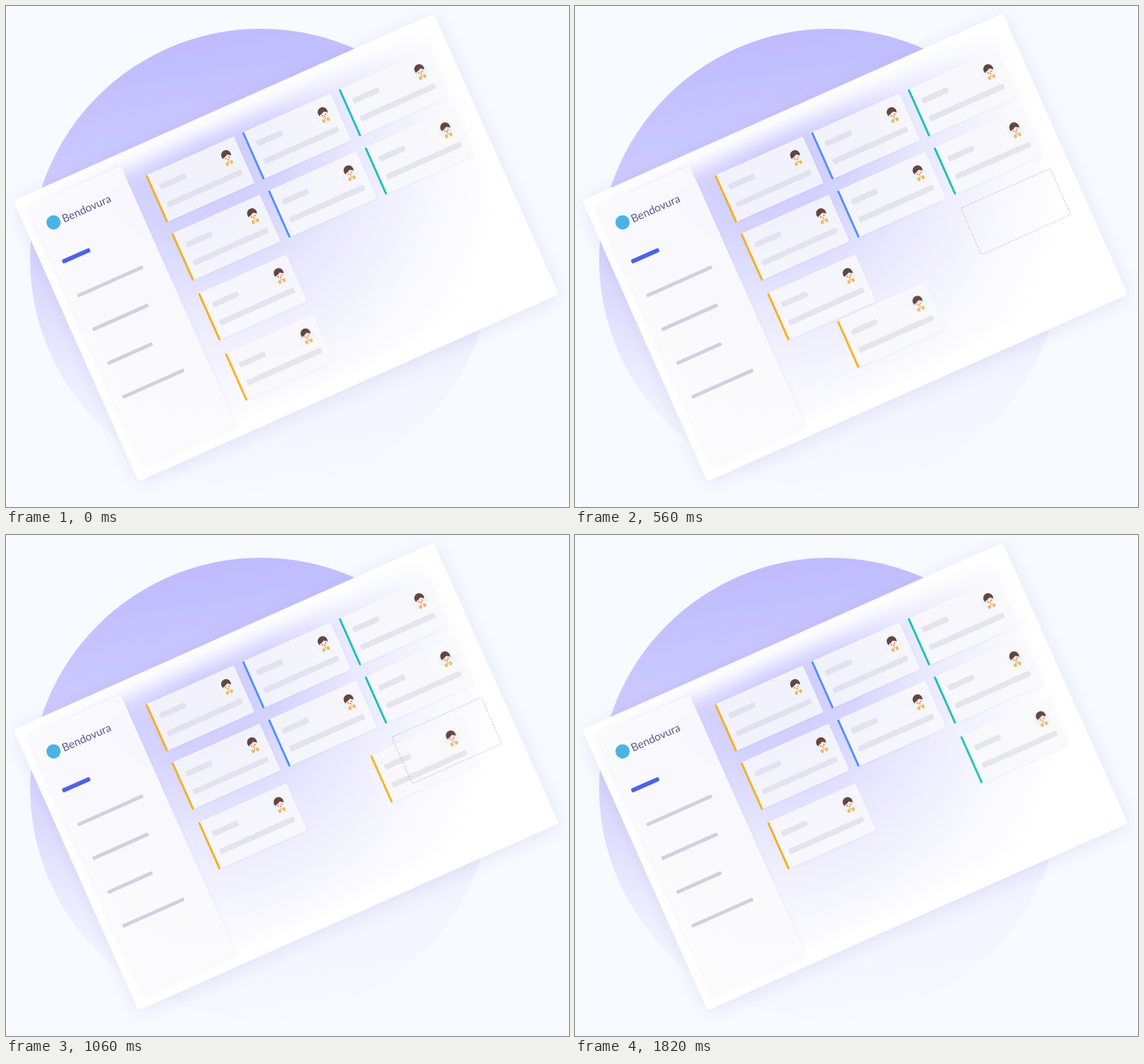
An HTML page that plays this animation: 793 px wide and 706 px high, repeating every 4.46 s.

```html
<!DOCTYPE html>
<html lang="en">
<head>
<meta charset="utf-8">
<title>Task board</title>
<style>
  html, body { margin: 0; width: 100%; height: 100%; overflow: hidden; background: #f7fbff; }
  svg { display: block; width: 100%; height: 100%; }
  .panel { fill: #fff; filter: drop-shadow(0 4px 12px rgba(90, 90, 190, .14)); }
  .sidebar { fill: #fcfcfd; fill-opacity: .9; filter: drop-shadow(0 1px 3px rgba(90, 90, 160, .08)); }
  .sheet { fill: #fcfcfd; fill-opacity: .82; filter: drop-shadow(0 1px 1.5px rgba(90, 90, 180, .09)); }
  .bar { fill: #c4c4da; fill-opacity: .38; }
  .menu { fill: #d0d0e1; }
  .brand { font: 15.5px Lato, sans-serif; fill: #5a5a8f; }
  .slot { fill: none; stroke: #b8b8c2; stroke-dasharray: 2 2; }
</style>
</head>
<body>
<svg viewBox="0 0 793 706">
  <defs>
    <linearGradient id="discFill" x1=".42" y1="0" x2=".58" y2="1">
      <stop offset="0" stop-color="#bfbbff"/>
      <stop offset=".28" stop-color="#cdcbff"/>
      <stop offset=".5" stop-color="#dddcfe"/>
      <stop offset=".66" stop-color="#eaebff"/>
      <stop offset=".8" stop-color="#f2f5ff"/>
      <stop offset="1" stop-color="#f6faff"/>
    </linearGradient>
    <radialGradient id="glow" gradientUnits="userSpaceOnUse" cx="270" cy="205" r="430"
        gradientTransform="rotate(24) translate(-10.4 -274.3)">
      <stop offset="0" stop-color="#cccaff"/>
      <stop offset=".25" stop-color="#d4d2ff"/>
      <stop offset=".5" stop-color="#e8e8ff"/>
      <stop offset=".75" stop-color="#f6f6ff"/>
      <stop offset="1" stop-color="#fff"/>
    </radialGradient>
    <filter id="soft" x="-10%" y="-10%" width="120%" height="120%">
      <feGaussianBlur stdDeviation="13"/>
    </filter>
    <clipPath id="panelClip"><rect width="648" height="433" rx="4"/></clipPath>

    <g id="avatar">
      <circle r="12" fill="#eef5fd"/>
      <path d="M-4.5 2H4.5L6 10.5H-6Z" fill="#fff3ea"/>
      <circle cx=".3" cy="-4.2" r="7" fill="#65463f"/>
      <ellipse cx=".3" cy="-.6" rx="5.9" ry="4.8" fill="#fde8df"/>
      <path d="M-6.2-1.5Q-5-7 1-7Q6-6 6.8-1.5Q4-2.6 2-4.4Q-2-1.8-6.2-1.5Z" fill="#65463f"/>
      <circle cx="-2.3" cy=".2" r=".7" fill="#4a3030"/>
      <circle cx="2.9" cy=".2" r=".7" fill="#4a3030"/>
      <ellipse cx=".3" cy="2.4" rx="1.2" ry=".8" fill="#e2655f"/>
      <rect x="-5.2" y="5.5" width="4" height="5" rx="1.5" fill="#e5bd62"/>
      <rect x="1.4" y="5.5" width="4" height="5" rx="1.5" fill="#e5bd62"/>
      <circle cy="5.8" r="1.6" fill="#f3c4ae"/>
    </g>
    <g id="card">
      <rect class="sheet" width="135" height="72" rx="2"/>
      <rect x="-1.2" y=".3" width="2.8" height="72" rx="1" fill="currentColor"/>
      <rect class="bar" x="11" y="19" width="39.7" height="8" rx="2"/>
      <rect class="bar" x="10.3" y="46.3" width="115" height="8" rx="2"/>
      <use href="#avatar" x="114" y="23.9"/>
    </g>
  </defs>

  <rect width="793" height="706" fill="#f7fbff"/>
  <circle cx="359" cy="357" r="325" fill="url(#discFill)"/>

  <g transform="translate(10.4 274.3) rotate(-24)">
    <rect class="panel" width="648" height="433" rx="4"/>
    <g clip-path="url(#panelClip)">
      <rect width="648" height="433" fill="url(#glow)"/>
      <rect width="648" height="433" fill="none" stroke="#fff" stroke-width="50" filter="url(#soft)"/>
    </g>
    <rect class="sidebar" x="15" y="17" width="143" height="400" rx="2"/>
    <circle cx="39.2" cy="51" r="10" fill="#4bb3e4"/>
    <text class="brand" x="52.5" y="57.5">Bendovura</text>
    <g id="menu"><rect x="28" y="104" width="42.5" height="6" rx="2" fill="#4d62e8"/></g>
    <g id="board"></g>
    <rect id="slot" class="slot" x="482.5" y="226.5" width="138" height="71.5" rx="2"/>
  </g>
</svg>
<script>
  const LOOP = 4460;
  const AMBER = '#faad14', BLUE = '#4d90fe', TEAL = '#13c2b3';
  const LEFT = 185.5, TOP = 43.5, COLUMN = 148.9;
  const ROWS = [0, 89.8, 182, 275];
  const board = document.getElementById('board');

  function add(parent, tag, attrs) {
    const node = document.createElementNS('http://www.w3.org/2000/svg', tag);
    for (const key in attrs) node.setAttribute(key, attrs[key]);
    return parent.appendChild(node);
  }

  function addCard(column, row, color) {
    const card = add(board, 'use', { href: '#card', x: LEFT + column * COLUMN, y: TOP + ROWS[row] });
    card.style.color = color;
    return card;
  }

  [100.7, 86, 69, 94.7].forEach((width, i) =>
    add(document.getElementById('menu'), 'rect',
      { class: 'menu', x: 28, y: 157 + i * 52.1, width, height: 5, rx: 1.5 }));

  [[AMBER, 3], [BLUE, 2], [TEAL, 2]].forEach(([color, count], column) => {
    for (let row = 0; row < count; row++) addCard(column, row, color);
  });
  const dragged = addCard(0, 3, AMBER);

  // Each step is [time in ms, styles, easing to the next step].
  function loop(node, steps) {
    const frames = steps.map(([time, style, easing = 'linear']) =>
      ({ offset: time / LOOP, easing, ...style }));
    node.animate(frames, { duration: LOOP, iterations: Infinity });
  }

  const at = (x, y) => ({ transform: `translate(${x}px, ${y}px)` });
  const drop = at(2 * COLUMN, ROWS[2] - ROWS[3]);

  loop(dragged, [
    [0, at(0, 0), 'ease'],
    [380, at(22.5, 0), 'ease'],
    [1580, drop],
    [LOOP, drop]
  ]);
  loop(dragged, [
    [0, { color: AMBER }, 'step-end'],
    [1820, { color: TEAL }],
    [LOOP, { color: TEAL }]
  ]);
  loop(document.getElementById('slot'), [
    [0, { opacity: 0 }],
    [200, { opacity: 1 }, 'step-end'],
    [1700, { opacity: 0 }],
    [LOOP, { opacity: 0 }]
  ]);
</script>
</body>
</html>
```
